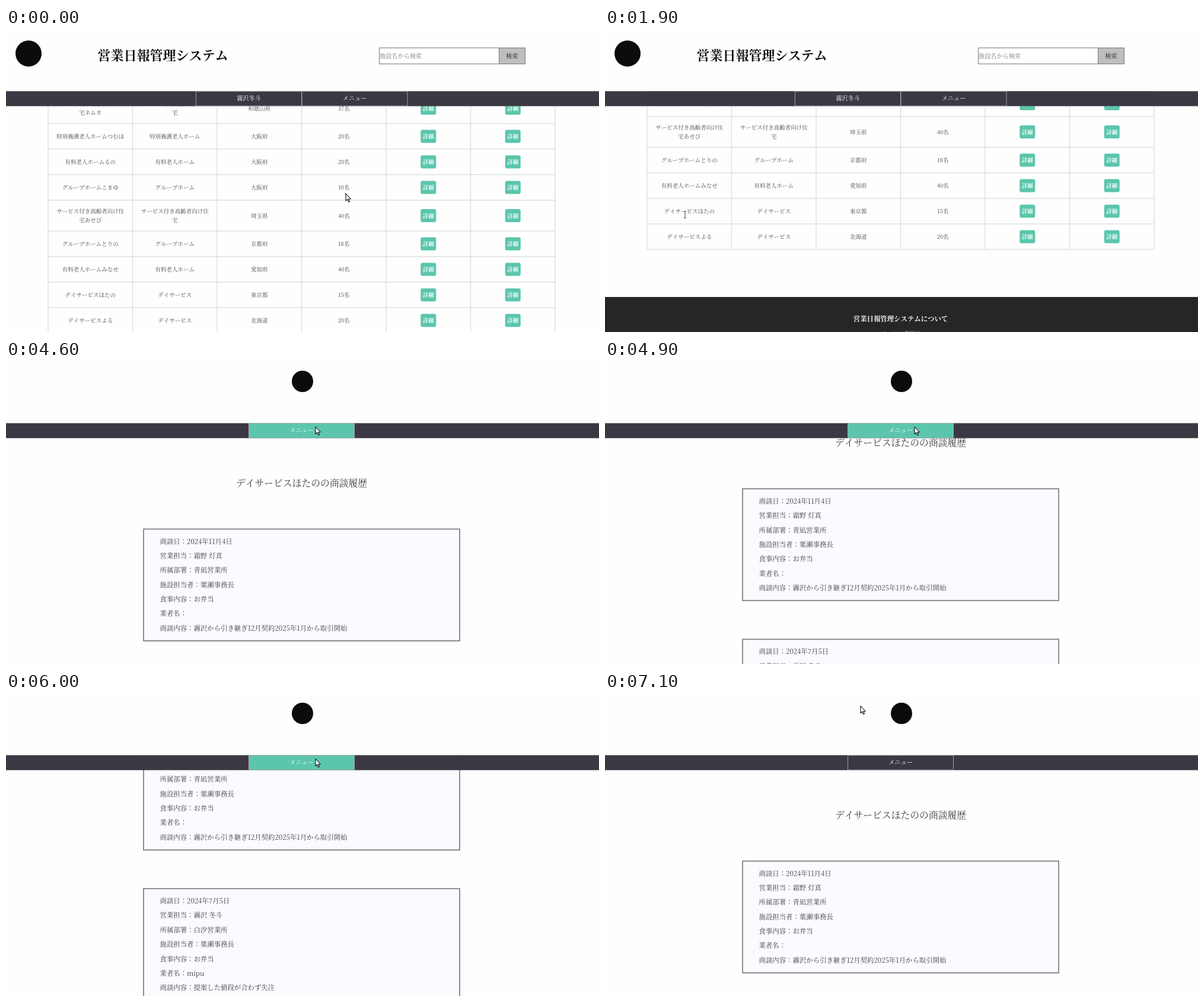
Write an HTML page with a canvas that moves like this. It is 1000x512 px and loops after 7200 ms.

```html
<!DOCTYPE html>
<html lang="ja">
<head>
<meta charset="utf-8">
<title>営業日報管理システム</title>
<style>
html, body { margin: 0; width: 100%; height: 100%; overflow: hidden; background: #fefefe; }
canvas { display: block; }
</style>
</head>
<body>
<canvas id="stage" width="1000" height="512"></canvas>
<script>
const ctx = document.getElementById('stage').getContext('2d');
const FONT = '"Noto Serif CJK JP", "Noto Serif JP", "Noto Serif", "Noto Sans CJK JP", serif';
const LOOP = 7200, STEP = 100, PAGE_CUT = 3800, LIST_SCROLL = 141;
const PAPER = '#fefefe', BAR = '#3b3843', MINT = '#5bc6ac', TEAL = '#0a7c84', INK = '#3c3a3e';
const NAV = { top: 106.4, height: 25.2 };

// Keyframes: time followed by one or more values
const listScroll = [[700, 0], [1500, LIST_SCROLL]];
const recordScroll = [[4600, 0], [5300, 212], [5630, 266], [6000, 207], [6600, 0]];
const listPointer = [[1500, 573, 279], [1800, 165, 312], [1900, 135, 314.5], [2000, 150, 314],
  [2300, 463, 312], [2700, 790, 314], [3000, 866, 316]];
const recordPointer = [[4200, 862, 316], [4600, 522, 112.5], [6600, 522, 112.5], [7100, 431, 23.5]];

const home = 'サービス付き高齢者向け住';
const rows = [
  [[home, '宅ネムカ'], [home, '宅'], '和歌山県', '37名'],
  ['特別養護老人ホームつむほ', '特別養護老人ホーム', '大阪府', '20名'],
  ['有料老人ホームるの', '有料老人ホーム', '大阪府', '20名'],
  ['グループホームこまゆ', 'グループホーム', '大阪府', '10名'],
  [[home, '宅あせび'], [home, '宅'], '埼玉県', '40名'],
  ['グループホームとりの', 'グループホーム', '京都府', '18名'],
  ['有料老人ホームみなせ', '有料老人ホーム', '愛知県', '40名'],
  ['デイサービスほたの', 'デイサービス', '東京都', '15名'],
  ['デイサービスよる', 'デイサービス', '北海道', '20名']
];
const labels = ['商談日', '営業担当', '所属部署', '施設担当者', '食事内容', '業者名', '商談内容'];
const records = [
  ['2024年11月4日', '霜野 灯真', '青凪営業所', '葉瀬事務長', 'お弁当', '', '霧沢から引き継ぎ12月契約2025年1月から取引開始'],
  ['2024年7月5日', '霧沢 冬斗', '白汐営業所', '葉瀬事務長', 'お弁当', 'mipu', '提案した値段が合わず失注']
];
const TABLE = { left: 71, top: 109, col: 142.5 };
const colCenter = i => TABLE.left + TABLE.col * (i + 0.5);
const rowHeight = row => Array.isArray(row[0]) ? 52 : 43;

// Monotone cubic interpolation of one column of keyframes
function track(keys, t, col = 1) {
  const last = keys.length - 1;
  if (t <= keys[0][0]) return keys[0][col];
  if (t >= keys[last][0]) return keys[last][col];
  const i = keys.findIndex(k => k[0] > t) - 1;
  const slope = n => (keys[n + 1][col] - keys[n][col]) / (keys[n + 1][0] - keys[n][0]);
  const tangent = n => {
    if (n === 0 || n === last) return 0;
    const a = slope(n - 1), b = slope(n);
    return a * b <= 0 ? 0 : 2 * a * b / (a + b);
  };
  const span = keys[i + 1][0] - keys[i][0], u = (t - keys[i][0]) / span;
  const ease = u * u * (3 - 2 * u);
  return keys[i][col] * (1 - ease) + keys[i + 1][col] * ease +
    span * (u * (1 - u) * (1 - u) * tangent(i) - u * u * (1 - u) * tangent(i + 1));
}

function rect(x, y, w, h, color) {
  ctx.fillStyle = color;
  ctx.fillRect(x, y, w, h);
}

function frame(x, y, w, h, color, width = 1) {
  ctx.strokeStyle = color;
  ctx.lineWidth = width;
  ctx.strokeRect(x, y, w, h);
}

// y is the vertical centre of the characters
function text(str, x, y, size, color, align = 'center', weight = 400) {
  ctx.font = `${weight} ${size}px ${FONT}`;
  ctx.textAlign = align;
  ctx.fillStyle = color;
  ctx.fillText(str, x, y + size * 0.38);
}

function disc(x, y, r) {
  ctx.fillStyle = '#0c0c0c';
  ctx.beginPath();
  ctx.arc(x, y, r, 0, Math.PI * 2);
  ctx.fill();
}

function detailButton(x, y, hot) {
  ctx.fillStyle = hot ? TEAL : MINT;
  ctx.beginPath();
  ctx.roundRect(x - 13, y - 11, 26, 22, 3);
  ctx.fill();
  text('詳細', x, y, 9.4, '#fff', 'center', 700);
}

function navItem(label, x, w, hot) {
  if (hot) rect(x, NAV.top, w, NAV.height, MINT);
  frame(x + 0.5, NAV.top + 0.4, w - 1, NAV.height - 0.8, '#aaa8ae', 0.9);
  text(label, x + w / 2, 118.5, 10.2, '#fff');
}

function header() {
  rect(0, 0, 1000, NAV.top, PAPER);
  rect(0, NAV.top, 1000, NAV.height, BAR);
}

// Draws the table and returns the pointer shape for what lies under it
function table(scroll, px, py, settled) {
  let y = TABLE.top - scroll, shape = 'arrow';
  const top = y, line = '#dcdfe3';
  for (const row of rows) {
    const h = rowHeight(row), mid = y + h / 2;
    rect(TABLE.left, y - 0.7, TABLE.col * 6, 1.4, line);
    row.forEach((cell, i) => {
      const lines = [].concat(cell), x = colCenter(i);
      lines.forEach((str, n) => {
        const cy = mid + (n - (lines.length - 1) / 2) * 15;
        text(str, x, cy, 9.5, '#48464a');
        const half = ctx.measureText(str).width / 2;
        if (settled && Math.abs(px - x) < half && Math.abs(py - cy) < 8) shape = 'beam';
      });
    });
    for (const i of [4, 5]) {
      const x = colCenter(i);
      const hot = settled && Math.abs(px - x) < 13 && Math.abs(py - mid) < 11;
      if (hot) shape = 'hand';
      detailButton(x, mid, hot);
    }
    y += h;
  }
  rect(TABLE.left, y - 0.7, TABLE.col * 6, 1.4, line);
  for (let i = 0; i <= 6; i++) rect(TABLE.left + TABLE.col * i - 0.7, top, 1.4, y - top, line);
  return shape;
}

function listPage(t) {
  const scroll = track(listScroll, t);
  const px = track(listPointer, t), py = track(listPointer, t, 2);
  const shape = table(scroll, px, py, t > 1500);
  const foot = 594 - scroll;
  rect(0, foot, 1000, 512, '#262626');
  text('営業日報管理システムについて', 498.5, foot + 37, 11.4, '#fff', 'center', 700);
  text('サービス利用法', 499.5, foot + 61, 9.5, '#d8d8d8');

  header();
  disc(38, 43, 22);
  text('営業日報管理システム', 154.5, 46, 22, '#111', 'left', 700);
  rect(629, 33, 203, 28, '#fff');
  frame(629.5, 33.5, 202, 27, '#77777a');
  text('施設名から検索', 630, 47, 10.2, '#7c7c7c', 'left');
  rect(831, 33, 45, 28, '#bebdbf');
  frame(831.5, 33.5, 44, 27, '#77777a');
  text('検索', 853.5, 47, 10.2, '#222');
  navItem('霧沢冬斗', 320, 179, false);
  navItem('メニュー', 498.5, 179, false);
  pointer(px, py, shape);
}

function recordPage(t) {
  const scroll = track(recordScroll, t);
  const px = track(recordPointer, t), py = track(recordPointer, t, 2);
  text('デイサービスほたのの商談履歴', 498.5, 207 - scroll, 15.8, INK);
  records.forEach((record, n) => {
    const top = 283.8 + n * 253.5 - scroll;
    rect(231, top, 535, 190, '#fafaff');
    frame(232, top + 0.9, 533, 188.3, '#88868b', 1.9);
    record.forEach((value, i) =>
      text(`${labels[i]}：${value}`, 259.5, top + 21.5 + i * 24.35, 11.4, INK, 'left'));
  });
  header();
  disc(500, 36, 18);
  const hot = px > 409 && px < 588 && py > NAV.top && py < NAV.top + NAV.height;
  navItem('メニュー', 409, 179, hot);
  pointer(px, py, 'arrow');
}

const shapes = {
  arrow: new Path2D('M0 0V12L2.7 9.6 4.7 14 6.6 13.2 4.7 9H8.3Z'),
  hand: new Path2D('M-1.8 .8Q-.4 -.8 .9 .8V6L2.8 5.4 4.2 6.2 5.8 6.2 7.4 7.6V12.5L6 17H-.2L-4.3 11.2Q-4.6 9.2 -1.8 10.4Z'),
  beam: new Path2D('M-2 -5.5H2M0 -5.5V5.5M-2 5.5H2')
};

function pointer(x, y, shape) {
  ctx.save();
  ctx.translate(x, y);
  ctx.lineWidth = 1.1;
  ctx.lineJoin = 'round';
  ctx.strokeStyle = shape === 'beam' ? '#555' : '#111';
  ctx.fillStyle = '#fff';
  if (shape !== 'beam') ctx.fill(shapes[shape]);
  ctx.stroke(shapes[shape]);
  ctx.restore();
}

function draw(now) {
  const t = Math.floor((now % LOOP) / STEP) * STEP;
  rect(0, 0, 1000, 512, PAPER);
  if (t < PAGE_CUT) listPage(t);
  else recordPage(t);
}

const start = performance.now();
function tick() {
  draw(performance.now() - start);
  requestAnimationFrame(tick);
}
tick();
</script>
</body>
</html>
```
